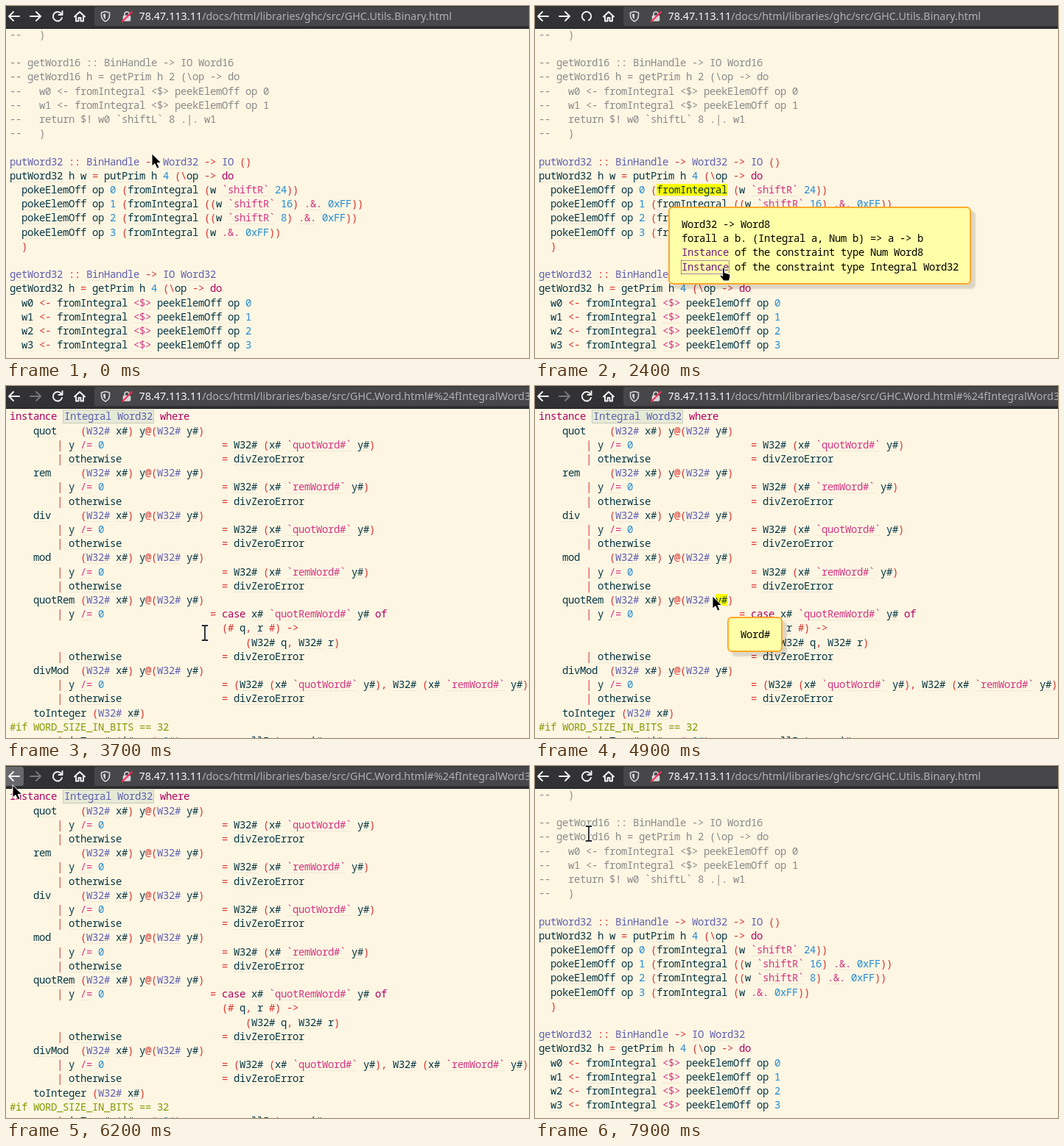
These frames come from a looping animation (710 by 479 pixels, 8 s). An HTML page:

```html
<!DOCTYPE html>
<html lang="en">
<head>
<meta charset="utf-8">
<title>Source browser</title>
<style>
html, body { margin: 0; width: 100%; height: 100%; overflow: hidden; background: #fdf6e3; }
#stage { position: relative; width: 710px; height: 479px; overflow: hidden; background: #fdf6e3; }
#stage > *, .page > * { position: absolute; }
.page { inset: 0; }
.page, .popup { font: 14px/16px "Noto Sans Mono", "DejaVu Sans Mono", monospace; letter-spacing: -.4px; white-space: pre; }
.page span { height: 16px; }
.op, .id, .type { border-bottom: 1px solid #eee8d5; }
.op { color: #d33682; }
.kw { color: #af005f; }
.num { color: #268bd2; }
.id { color: #073642; }
.type { color: #5f5faf; }
.sym { color: #dc322f; }
.note { color: #8a8a8a; }
.cpp { color: #859900; }
.mark { height: 16px; background: #ff0; }
.target { left: 77px; top: 32px; width: 122px; height: 17px; background: #e5ead6; border: 1px solid #c8cdbd; }
.popup { box-sizing: border-box; padding: 12px 16px 13.2px; line-height: 19.2px; color: #000; background: #ffffa8;
  border: 2px solid #ffa92c; border-radius: 6px; box-shadow: 6px 6px 2px rgba(0, 0, 0, .13); }
.popup b { font-weight: 400; color: #6c1a84; border-bottom: 1px solid #eee8d5; }
#focus { left: 198px; top: 346px; width: 64px; height: 17px; border: 1px dotted #6c1a84; }
#bar { left: 0; top: 0; width: 710px; height: 30px; background: #323234; border-bottom: 1px solid #0c0c0d; }
#field { left: 120px; top: 1px; width: 600px; height: 26px; border-radius: 3px; background: #474749; }
#url { left: 180.5px; top: 0; font: 14.4px/28px "Noto Sans", "Open Sans", sans-serif; color: #b1b1b3; white-space: pre; }
#url i { font-style: normal; color: #f9f9fa; }
svg { left: 0; top: 0; overflow: visible; }
</style>
</head>
<body>
<div id="stage">
  <div class="page" id="binary"><div class="mark" id="markCall" style="left:165px;top:242px;width:96px"></div></div>
  <div class="page" id="word"><div class="target"></div><div class="mark" id="markArg" style="left:245px;top:283px;width:16px"></div></div>
  <div class="popup" id="popCall" style="left:181px;top:273px;width:411px">Word32 -&gt; Word8
forall a b. (Integral a, Num b) =&gt; a -&gt; b
<b>Instance</b> of the constraint type Num Word8
<b>Instance</b> of the constraint type Integral Word32</div>
  <div id="focus"></div>
  <div class="popup" id="popArg" style="left:261px;top:314px;width:75px">Word#</div>
  <div id="bar"></div>
  <div id="field"></div>
  <div id="url"><i>78.47.113.11</i><span id="path"></span></div>
  <svg width="710" height="479" fill="none" stroke="#f0f0f1" stroke-width="2" stroke-linecap="round" stroke-linejoin="round">
    <rect id="hover" x="-4" y="1" width="28" height="26" rx="3" fill="#69696d" stroke="none"/>
    <path d="M18 14H4M10 8L4 14L10 20"/>
    <path id="forward" d="M33 14H47M41 8L47 14L41 20"/>
    <path id="reload" d="M75 10.5A6.2 6.2 0 1 0 76 16M76.5 7V12H71.5"/>
    <path id="spinner" d="M67 19.4A6.2 6.2 0 1 1 73 19.4"/>
    <path id="stop" d="M65 9L75 19M75 9L65 19"/>
    <path d="M93 14.5L100 8L107 14.5M95 14V20.5H98.5V16H101.5V20.5H105V14"/>
    <g stroke="#d7d7db" stroke-width="1.6">
      <path d="M135 7.5L140.5 9V13C140.5 17 138 19.5 135 21C132 19.5 129.5 17 129.5 13V9Z"/>
      <path d="M135 10.5V18C133 16.5 132 15 132 11.2Z" fill="#d7d7db" stroke="none"/>
      <path d="M161 13V11A3 3 0 0 1 167 11V13"/>
      <rect x="159.5" y="13.5" width="9" height="6.5" rx="1" fill="#d7d7db"/>
      <path d="M158 21L171 8" stroke="#ff2c55" stroke-width="2"/>
    </g>
    <g id="cursor" stroke="#fff" stroke-width="1">
      <path id="arrow" fill="#000" d="M0 0V17L4 13.5L7 20L10 18.7L7.2 12.5H12.5Z"/>
      <path id="hand" fill="#000" d="M-1.5 1Q0 -1.5 1.5 1V7L7 8.5Q9 9 9 11.5L7.5 18H0L-4.5 12Q-5 9.5 -3 10L-1.5 11.5Z"/>
      <g id="beam"><path stroke-width="4" d="M-3.5 -10H-1L0 -9L1 -10H3.5M0 -9V9M-3.5 10H-1L0 9L1 10H3.5"/>
        <path stroke="#222" stroke-width="1.8" d="M-3.5 -10H-1L0 -9L1 -10H3.5M0 -9V9M-3.5 10H-1L0 9L1 10H3.5"/></g>
    </g>
  </svg>
</div>
<script>
const $ = id => document.getElementById(id);

const binaryCode = String.raw`--   )

-- getWord16 :: BinHandle -> IO Word16
-- getWord16 h = getPrim h 2 (\op -> do
--   w0 <- fromIntegral <$> peekElemOff op 0
--   w1 <- fromIntegral <$> peekElemOff op 1
--   return $! w0 'shiftL' 8 .|. w1
--   )

putWord32 :: BinHandle -> Word32 -> IO ()
putWord32 h w = putPrim h 4 (\op -> do
  pokeElemOff op 0 (fromIntegral (w 'shiftR' 24))
  pokeElemOff op 1 (fromIntegral ((w 'shiftR' 16) .&. 0xFF))
  pokeElemOff op 2 (fromIntegral ((w 'shiftR' 8) .&. 0xFF))
  pokeElemOff op 3 (fromIntegral (w .&. 0xFF))
  )

getWord32 :: BinHandle -> IO Word32
getWord32 h = getPrim h 4 (\op -> do
  w0 <- fromIntegral <$> peekElemOff op 0
  w1 <- fromIntegral <$> peekElemOff op 1
  w2 <- fromIntegral <$> peekElemOff op 2
  w3 <- fromIntegral <$> peekElemOff op 3`;

const head = name => "    " + name.padEnd(8) + "(W32# x#) y@(W32# y#)";
const guard = (cond, result, col = 36) => ("        | " + cond).padEnd(col) + "= " + result;
const other = guard("otherwise", "divZeroError");
const method = (name, prim) => [head(name), guard("y /= 0", `W32# (x# '${prim}' y#)`), other];
const wordCode = [
  "instance Integral Word32 where",
  ...method("quot", "quotWord#"), ...method("rem", "remWord#"),
  ...method("div", "quotWord#"), ...method("mod", "remWord#"),
  head("quotRem"),
  guard("y /= 0", "case x# 'quotRemWord#' y# of", 34),
  " ".repeat(36) + "(# q, r #) ->",
  " ".repeat(40) + "(W32# q, W32# r)",
  other,
  head("divMod"),
  guard("y /= 0", "(W32# (x# 'quotWord#' y#), W32# (x# 'remWord#' y#))"),
  other,
  "    toInteger (W32# x#)",
  "#if WORD_SIZE_IN_BITS == 32",
  guard("isTrue# (i# >=# 0#)", "smallInteger i#")
].join("\n");

const tokens = /(`[\w#]+`|\.&\.|<\$>|\/=|>=#)|\b(do|case|of|where|instance)\b|(\d[\w#]*)|([A-Za-z]\w*#?)|(\S)/g;
const kinds = ["op", "kw", "num", "id", "sym"];

function addToken(page, text, kind, left, top) {
  const span = document.createElement("span");
  span.className = kind;
  span.textContent = text;
  span.style.left = left + "px";
  span.style.top = top + "px";
  page.append(span);
}

function typeset(page, code, firstRow) {
  code.replaceAll("'", "`").split("\n").forEach((line, row) => {
    const top = Math.floor(firstRow + 19.2 * row) - 8;
    if (/^(--|#)/.test(line)) return addToken(page, line, line[0] === "#" ? "cpp" : "note", 5, top);
    const signature = line.includes("::");
    const instance = line.startsWith("instance");
    const pattern = instance || /^ {4}\w/.test(line);
    for (const m of line.matchAll(tokens)) {
      let kind = kinds[m.slice(1).findIndex(Boolean)];
      if (kind === "id" && (signature || pattern && /^[A-Z]/.test(m[0]))) kind = "type";
      // The framed instance name pads the line by 2px on each side
      const pad = !instance || !m.index ? 0 : kind === "type" ? 2 : 4;
      addToken(page, m[0], kind, 5 + 8 * m.index + pad, top);
    }
  });
}
typeset($("binary"), binaryCode, 39.2);
typeset($("word"), wordCode, 41.8);

// Pointer stops: time, x, y
const stops = [
  [0, 198, 201], [200, 198, 201], [400, 201, 238], [500, 201, 238], [600, 201, 247], [1100, 201, 247],
  [1800, 256, 356], [2900, 256, 356], [3000, 261, 339], [3200, 261, 339], [3700, 270, 336], [4300, 270, 336],
  [4900, 241, 286], [5200, 241, 286], [6100, 11, 43], [6200, 9, 26], [6300, 9, 26], [6900, 8, 19],
  [7700, 8, 19], [7900, 73, 92], [8000, 73, 92]
];

function pointerAt(t) {
  const i = stops.findIndex(s => s[0] > t);
  const [t0, x0, y0] = stops[i - 1], [t1, x1, y1] = stops[i];
  const k = (t - t0) / (t1 - t0);
  return [x0 + (x1 - x0) * k, y0 + (y1 - y0) * k];
}

const show = (id, on) => { $(id).style.visibility = on ? "visible" : "hidden"; };

function draw() {
  const t = Math.floor(performance.now() % 8000 / 100) * 100;
  const within = (from, to) => t >= from && t < to;
  const onWord = within(2900, 7400);
  const hovered = within(600, 2900) || within(7400, 7800);
  show("binary", !onWord);
  show("word", onWord);
  show("markCall", hovered);
  show("popCall", hovered);
  $("popCall").style.opacity = t === 600 ? .5 : 1;
  show("focus", within(2200, 2900) || within(7400, 7800));
  show("markArg", within(4700, 5300));
  show("popArg", within(4800, 5300));

  $("path").textContent = "/docs/html/libraries/" +
    (onWord ? "base/src/GHC.Word.html#%24fIntegralWord32" : "ghc/src/GHC.Utils.Binary.html");
  $("forward").style.stroke = onWord ? "#77777a" : "";
  show("hover", within(6200, 7800));
  const spinning = within(2300, 2900) || within(3300, 3700);
  const stopping = within(2900, 3300);
  show("spinner", spinning);
  show("stop", stopping);
  show("reload", !spinning && !stopping);

  const hand = within(1700, 3000), beam = within(3000, 4400) || t >= 7900;
  show("hand", hand);
  show("beam", beam);
  show("arrow", !hand && !beam);
  $("cursor").setAttribute("transform", `translate(${pointerAt(t).map(Math.round)})`);
  requestAnimationFrame(draw);
}
draw();
</script>
</body>
</html>
```
